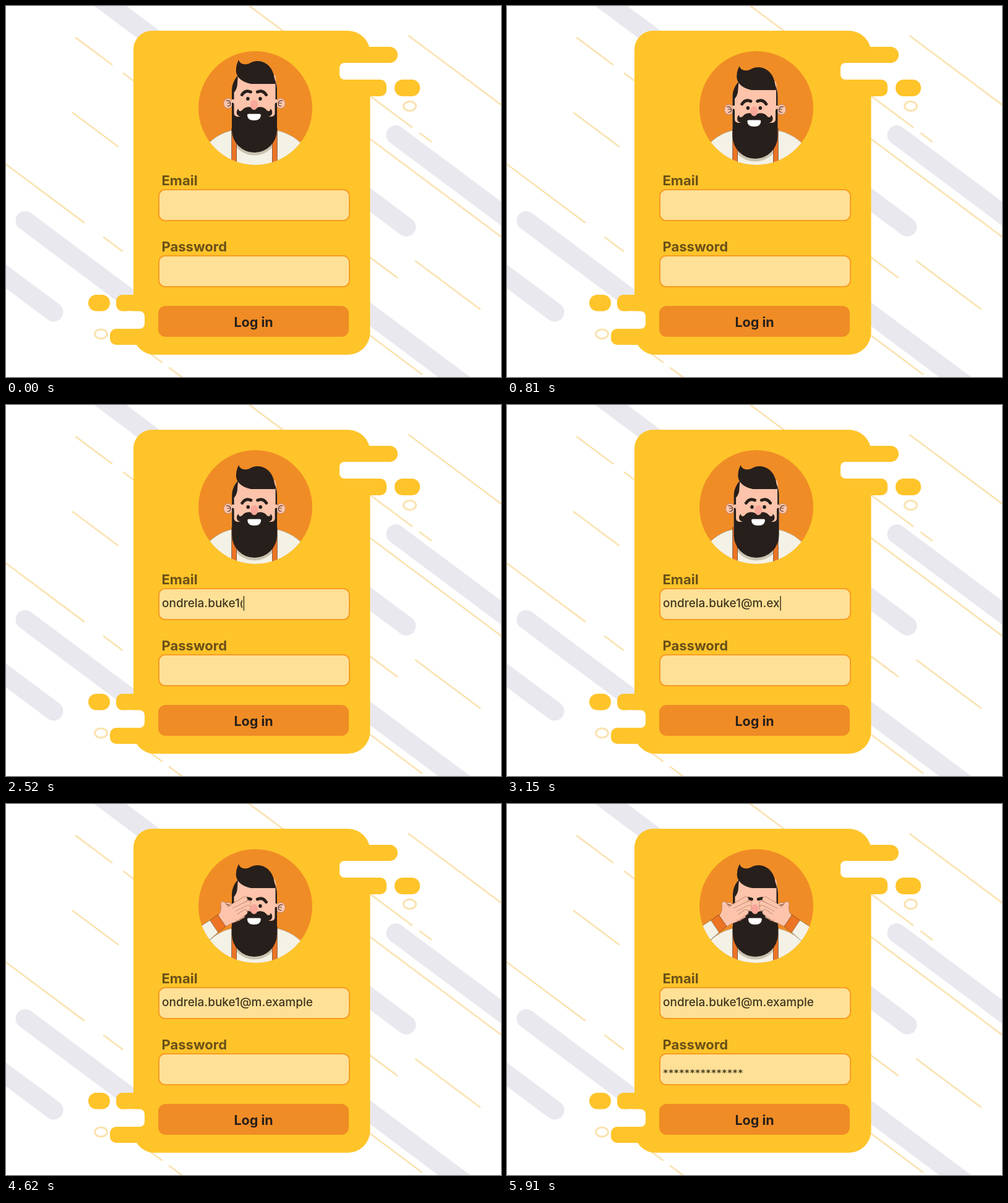
An HTML page with a canvas that plays this animation: 800 px wide and 600 px high, repeating every 6300 ms.

```html
<!DOCTYPE html>
<html lang="en">
<head>
<meta charset="utf-8">
<title>Login form</title>
<style>
  html, body { margin: 0; width: 100%; height: 100%; overflow: hidden; background: #fff; }
  canvas { display: block; width: 800px; height: 600px; }
</style>
</head>
<body>
<canvas id="stage" width="800" height="600"></canvas>
<script>
const ctx = document.getElementById('stage').getContext('2d');
const LOOP = 6300, STEP = 30;
const YELLOW = '#ffc42a', ORANGE = '#f08c26', STRAP = '#ec7424', GREY = '#e9e8ef', SAND = '#fae2b0';
const DARK = '#271f1b', SKIN = '#fdc4ab', SHIRT = '#f4f2e6', INK = '#41361f', LABEL = '#6a5018';
const EMAIL = 'ondrela.buke1@m.example';
const SLOPE = 0.747;
const AXIS = 401.5;

const clamp = (v, lo, hi) => Math.min(hi, Math.max(lo, v));
const progress = (t, from, to) => clamp((t - from) / (to - from), 0, 1);
const smooth = p => p * p * (3 - 2 * p);
const easeOut = p => 1 - (1 - p) ** 3;

function strokePath(d, color, width) {
  ctx.strokeStyle = color;
  ctx.lineWidth = width;
  ctx.stroke(new Path2D(d));
}

function fillPath(d, color, outline) {
  ctx.fillStyle = color;
  ctx.fill(new Path2D(d));
  if (outline) strokePath(d, outline, 0.7);
}

function box(x1, y1, x2, y2, radius, color, border) {
  ctx.beginPath();
  ctx.roundRect(x1, y1, x2 - x1, y2 - y1, radius);
  ctx.fillStyle = color;
  ctx.fill();
  if (border) {
    ctx.strokeStyle = border;
    ctx.lineWidth = 2;
    ctx.stroke();
  }
}

function oval(x, y, rx, ry, color, lineWidth) {
  ctx.beginPath();
  ctx.ellipse(x, y, rx, ry, 0, 0, Math.PI * 2);
  ctx.fillStyle = ctx.strokeStyle = color;
  ctx.lineWidth = lineWidth || 1;
  if (lineWidth) ctx.stroke();
  else ctx.fill();
}

function text(str, x, y, font, color, align = 'left') {
  ctx.font = font;
  ctx.fillStyle = color;
  ctx.textAlign = align;
  ctx.fillText(str, x, y);
}

function shifted(dx, dy, draw) {
  ctx.save();
  ctx.translate(dx, dy);
  draw();
  ctx.restore();
}

function flipped(draw) {
  ctx.save();
  ctx.translate(2 * AXIS, 0);
  ctx.scale(-1, 1);
  draw();
  ctx.restore();
}

function bothSides(draw) {
  draw();
  flipped(draw);
}

// All background strokes share one slope; offset is the height at x = 0.
function slanted(offset, from, to, color, width) {
  strokePath(`M${from} ${offset + from * SLOPE}L${to} ${offset + to * SLOPE}`, color, width);
}
const band = (offset, from, to) => slanted(offset, from, to, GREY, 31);
const streak = (offset, from, to) => slanted(offset, from, to, SAND, 2.6);

function drawBackground() {
  ctx.fillStyle = '#fff';
  ctx.fillRect(0, 0, 800, 600);
  ctx.lineCap = 'round';
  band(-262, 630, 830);
  band(-126, 120, 647);
  band(59, 560, 800);
  band(324, 31, 230);
  band(437.5, -50, 77);

  streak(-438, 651, 830);
  streak(-294, 380, 656);
  streak(-294, 669, 687);
  streak(-224.5, 560, 830);
  streak(-82, 662, 766);
  streak(-33, 113, 171);
  streak(-33, 190, 632);
  streak(92, 108, 181);
  streak(93.5, 560, 672);
  streak(256, -20, 126);
  streak(256, 158, 188);
  streak(388, 220, 252);
  streak(388, 264, 285);

  oval(652.5, 162, 10, 7.5, SAND, 3);
  oval(153.5, 530.5, 10, 7.5, SAND, 3);
}

function drawCard() {
  box(206, 40, 588.5, 564, [30, 36, 36, 34], YELLOW);
  box(550, 66, 633, 92, [0, 13, 13, 0], YELLOW);
  box(550, 119, 615, 146, [0, 10, 10, 0], YELLOW);
  box(539, 92, 600, 119, [8, 0, 0, 8], '#fff');
  box(628, 119, 669, 146, 13, YELLOW);
  box(133, 467, 168, 493.5, 13, YELLOW);
  box(178, 467, 240, 493.5, [10, 0, 0, 10], YELLOW);
  box(168, 522, 240, 548, [10, 0, 0, 10], YELLOW);
  box(196, 493.5, 224, 522, [0, 8, 8, 0], '#fff');

  ['Email', 'Password'].forEach((label, row) => {
    const y = 297 + row * 107;
    text(label, 251.5, y - 7.5, '700 22px Inter, sans-serif', LABEL);
    box(247, y, 555, y + 50, 10, '#fee096', '#f99c22');
  });
  box(246, 485, 554, 535, 12, ORANGE);
  text('Log in', 400, 519, '700 21.5px Inter, sans-serif', DARK, 'center');
}

function drawBody(headX, headY) {
  fillPath('M316 236Q336 206 370 200H433Q467 206 488 234V262H316Z', SHIRT, '#a8997c');
  shifted(headX, headY, () => oval(AXIS, 212, 35, 29.5, '#c9c3b0'));
  bothSides(() => fillPath('M365 198h7.5v64h-7.5Z', STRAP, '#5a3a20'));
}

function drawEar() {
  oval(359, 157.5, 7.3, 8.3, SKIN);
  oval(359, 157.5, 7.3, 8.3, '#a87560', 0.7);
  strokePath('M356 153q7 -1 7 5q0 4 -5 4M358 157h4', '#4a3028', 1.1);
}

function drawHead() {
  bothSides(drawEar);
  fillPath('M374 112H435L438 132V190H365V135Z', SKIN);
  fillPath('M375 112C368 120 365 128 365 137V151H368.5V140Q374 134 374 124Z', DARK);
  fillPath('M434 118Q438 126 438 136V151H435.5V125H433Z', DARK);
  fillPath('M376 87C378 95 388 96 395 92C402 88 412 88 420 93C431 100 434 112 435 126H396C380 123 370 113 372 101C372 96 374 92 376 87Z', DARK);
  fillPath('M365 157Q368 155 368.5 159V174Q369 179 376 179H427Q434 179 434.5 174V159Q435 155 438 157V200.5A36.5 36.5 0 0 1 365 200.5Z', DARK);
}

function drawMoustache() {
  fillPath('M402 167C396 162 388 162 383 167C380 171 376 171 375.5 166C371 170 372 178 379 179L390 184H402Z', DARK);
}

function drawEye() {
  oval(391.5, 150, 2.8, 2.9, DARK);
  strokePath('M382 143.5Q387.5 135 396 139', DARK, 5);
}

function drawFace(eyeDrop) {
  oval(AXIS, 160, 6, 8, '#f9a79a');
  fillPath('M390.500 176q0 -1.500 2 -1.500h18q2 0 2 1.500q0 9 -11 9t-11 -9Z', '#fff');
  ctx.lineCap = 'round';
  shifted(0, eyeDrop, () => bothSides(drawEye));
}

function drawHand() {
  const line = '#a5705a';
  fillPath('M308 202L331 187L343.5 207L322 226Z', SHIRT, '#77684e');
  fillPath('M343 180C349 174 347 166 347 160Q350 156 354 159L359 167L372 158L386 183Q374 190 367 192L355 198Z', SKIN, line);
  ctx.lineCap = 'round';
  for (let i = 0; i < 4; i++) {
    const tipX = 386 + 6 * Math.sin(i * Math.PI / 3);
    const finger = `M${366 + 2.5 * i} ${166 + 6 * i}L${tipX} ${154 + 7 * i}`;
    strokePath(finger, line, 9);
    strokePath(finger, SKIN, 7.8);
  }
  fillPath('M349 178L361 165L374 176L372 187L359 194Z', SKIN);
  strokePath('M355 161L362 165', line, 0.9);
  fillPath('M330 188L342 179L355 198L343 207.5Z', STRAP, '#7a431c');
}

function raiseHand(p) {
  const rest = 1 - easeOut(p);
  if (p > 0) shifted(-45 * rest, 88 * rest, drawHand);
}

// The gaze follows the caret, then returns to the middle.
function gaze(t) {
  const left = -10.4, right = 10;
  if (t < 1090) return left * smooth(progress(t, 720, 1090));
  if (t < 3800) return left + (right - left) * progress(t, 1090, 3800);
  return right * (1 - smooth(progress(t, 3960, 4350)));
}

function drawAvatar(t) {
  const drop = smooth(progress(t, 0, 660));
  const look = gaze(t), headX = look * 0.31, headY = drop * 10;
  oval(403, 165, 92, 92, ORANGE);
  ctx.save();
  ctx.beginPath();
  ctx.arc(403, 165, 92, 0, Math.PI * 2);
  ctx.clip();
  drawBody(headX, headY);
  shifted(headX, headY, drawHead);
  shifted(look * 0.45, headY, () => bothSides(drawMoustache));
  shifted(look - 0.6, headY, () => drawFace(drop * 5));
  raiseHand(progress(t, 4050, 4560));
  flipped(() => raiseHand(progress(t, 4650, 5220)));
  ctx.restore();
}

function typed(str, y, font, edge, done) {
  ctx.save();
  if (!done) {
    ctx.beginPath();
    ctx.rect(248, y - 30, edge - 248, 45);
    ctx.clip();
  }
  text(str, 252, y, font, INK);
  ctx.restore();
}

function caret(x, y, visible) {
  if (!visible) return;
  ctx.fillStyle = INK;
  ctx.fillRect(x - 0.8, y, 1.5, 23.5);
}

function drawTyping(t) {
  const emailX = clamp(253.5 + (t - 1087) * 0.0914, 253.5, 498);
  typed(EMAIL, 327, '500 19px Inter, sans-serif', emailX - 2.5, emailX === 498);
  caret(emailX, 309, t >= 960 && t < 3990);

  const passX = clamp(254.5 + (t - 4890) * 0.133, 254.5, 384);
  typed('*'.repeat(15), 438.5, '700 14.35px "DejaVu Sans Mono", monospace', passX - 2, passX === 384);
  caret(passX, 418, (t >= 4080 && t < 4560) || (t >= 4740 && t < 5910));
}

const start = performance.now();
function render() {
  const elapsed = (performance.now() - start) % LOOP;
  const t = Math.floor(elapsed / STEP) * STEP;
  drawBackground();
  drawCard();
  drawAvatar(t);
  drawTyping(t);
  requestAnimationFrame(render);
}
render();
</script>
</body>
</html>
```
